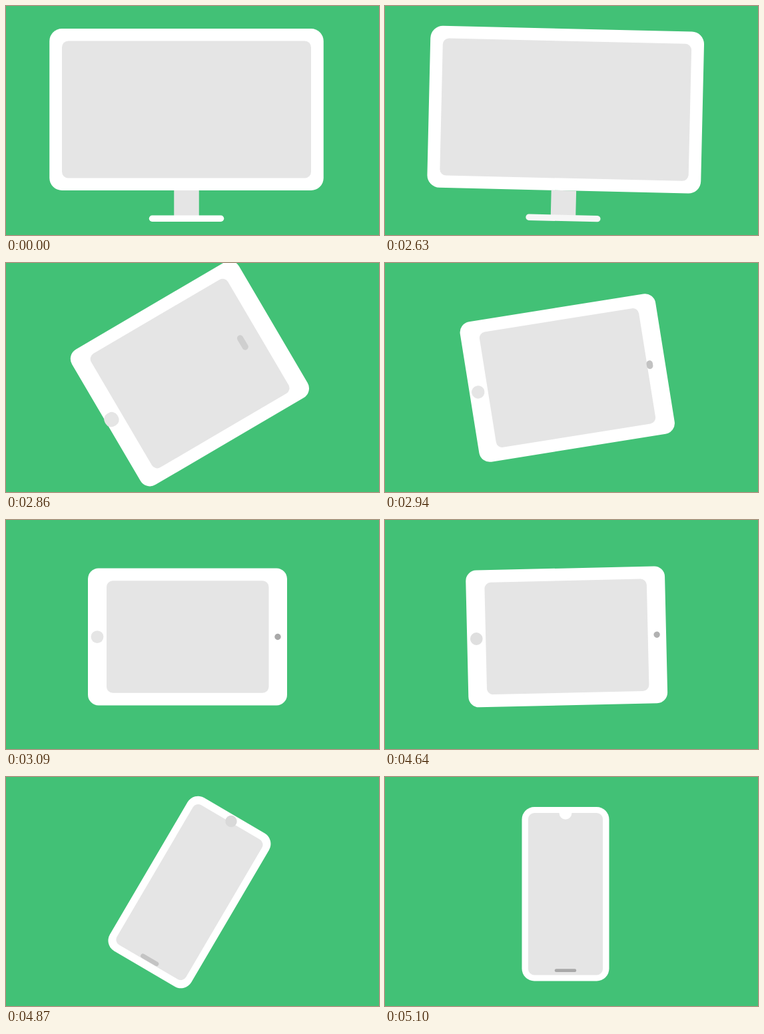
An HTML page for the animation above (5.88 s loop, 560 by 344 pixels).

```html
<!DOCTYPE html>
<html lang="en">
<head>
<meta charset="utf-8">
<title>Responsive devices</title>
<style>
html, body { margin: 0; width: 100%; height: 100%; overflow: hidden; background: #42c176; }
svg { display: block; width: 100vw; height: 100vh; }
</style>
</head>
<body>
<svg viewBox="0 0 560 344">
  <rect width="560" height="344" fill="#42c176"/>
  <g id="device"></g>
</svg>
<script>
const LOOP = 5880, STEP = 76.6, LEAD = 48, DURATION = 500;
const NS = 'http://www.w3.org/2000/svg';
const device = document.getElementById('device');

// Parts are [y, width, height, radius, grey], centred on the device axis.
const desktop = {
  x: 271, y: 155.5, angle: 0,
  body: [0, 411.5, 243, 18.7, 255],
  screen: [0, 374, 206, 9.4, 229],
  button: [140.5, 37.5, 38, 0, 229],
  dot: [163.7, 112.5, 9.4, 4.7, 255]
};
const tablet = {
  x: 272.5, y: 175.5, angle: 90,
  body: [0, 206, 299, 16, 255],
  screen: [-0.25, 168.5, 243.5, 9.2, 229],
  button: [135.5, 18.75, 18.75, 11, 229],
  dot: [-135.5, 9.4, 9.4, 4.7, 169]
};
const phone = {
  x: 271, y: 175.75, angle: 0,
  body: [0, 131, 261.5, 18.7, 255],
  screen: [0, 112, 243.5, 9.2, 229],
  button: [114.9, 32.5, 4.7, 2.35, 169],
  dot: [-121.5, 18.75, 18.75, 9.4, 255]
};
const moves = [
  { at: 2620, from: desktop, to: tablet },
  { at: 4630, from: tablet, to: phone }
];

const parts = {};
for (const name of ['body', 'screen', 'button', 'dot']) {
  parts[name] = device.appendChild(document.createElementNS(NS, 'rect'));
}

const clamp = v => Math.min(1, Math.max(0, v));
const lerp = (a, b, p) => a + (b - a) * p;

function bezier(x1, y1, x2, y2) {
  const at = (a, b, s) => 3 * (1 - s) ** 2 * s * a + 3 * (1 - s) * s * s * b + s ** 3;
  return t => {
    if (t <= 0 || t >= 1) return clamp(t);
    let lo = 0, hi = 1;
    for (let i = 0; i < 24; i++) {
      const mid = (lo + hi) / 2;
      if (at(x1, x2, mid) < t) lo = mid; else hi = mid;
    }
    return at(y1, y2, lo);
  };
}
const turnEase = bezier(0.645, 0.045, 0.355, 1);
const shapeEase = bezier(0.86, 0, 0.07, 1);

function setPart(name, from, to, p, t) {
  const [y, w, h, r] = from[name].map((v, i) => lerp(v, to[name][i], p));
  const grey = Math.round(lerp(from[name][4], to[name][4], t));
  const attrs = { x: -w / 2, y: y - h / 2, width: w, height: h, rx: r, fill: `rgb(${grey},${grey},${grey})` };
  for (const key in attrs) parts[name].setAttribute(key, attrs[key]);
}

function draw(now) {
  const move = now < moves[1].at ? moves[0] : moves[1];
  const { at, from, to } = move;
  // Motion advances in held steps.
  const t = now < at ? 0 : clamp((LEAD + Math.floor((now - at) / STEP) * STEP) / DURATION);
  const turn = turnEase(t);
  const shape = shapeEase(clamp(t * 1.1 - 0.03));
  const swing = Math.sin(Math.PI * turn);
  const x = lerp(from.x, to.x, turn) + 4.5 * swing;
  const y = lerp(from.y, to.y, turn) - 3 * swing;
  device.setAttribute('transform', `translate(${x} ${y}) rotate(${lerp(from.angle, to.angle, turn)})`);
  for (const name in parts) setPart(name, from, to, shape, t);
}

const start = performance.now();
function tick() {
  draw((performance.now() - start) % LOOP);
  requestAnimationFrame(tick);
}
tick();
</script>
</body>
</html>
```
